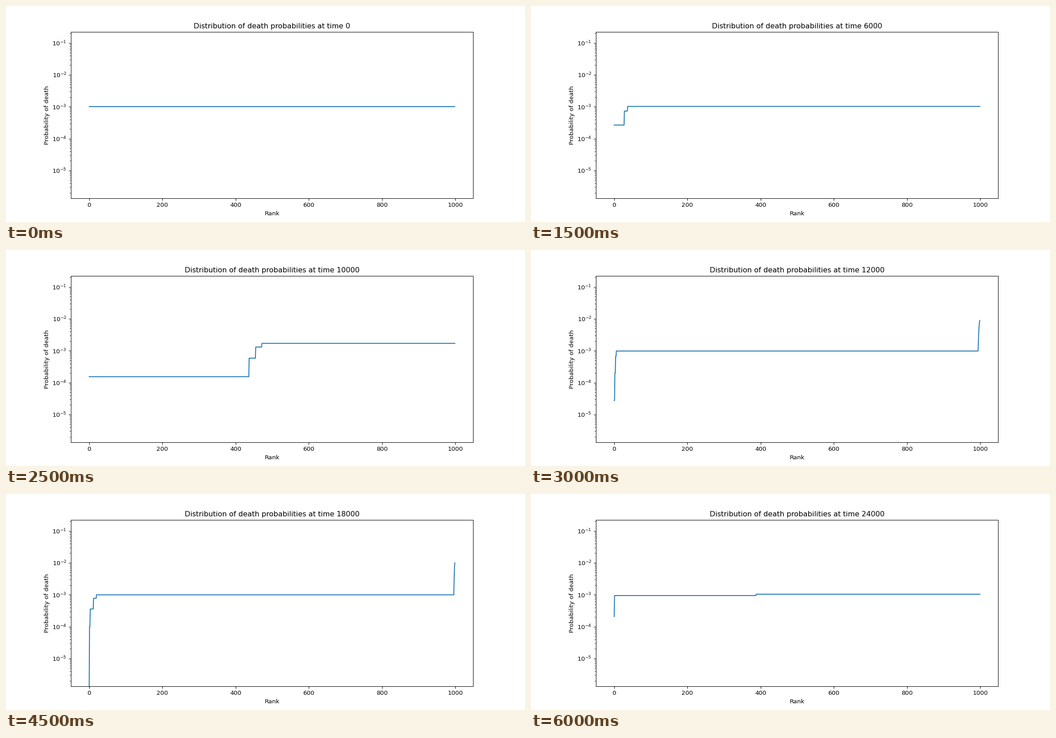
Recreate the animation shown at these times as a matplotlib script. Size 1159 by 483 pixels, loop 6500 ms.

```python
import matplotlib.pyplot as plt
import numpy as np
from matplotlib.animation import FuncAnimation

FIG_WIDTH, FIG_HEIGHT = 12, 5  # inches
DPI = 483 / FIG_HEIGHT         # gives a 1159 x 483 pixel canvas
COUNT = 1000
STEP_TIME = 2000
INTERVAL = 500

ranks = np.arange(COUNT)


def ease_out(t):
    return 1 - (1 - t) ** 2


def smoothstep(t):
    return t * t * (3 - 2 * t)


def staircase(low=1, first=0, last=None, stairs=1, ease=ease_out,
              runt=None, tail=1, peak=1):
    """Sorted death probabilities, with levels relative to the main plateau.

    The curve stays at `low` up to rank `first`, climbs in log scale to the
    plateau at rank `last`, and lifts its final `tail` ranks up to `peak`.
    `runt` is the level of the single lowest rank.
    """
    starts = np.linspace(first, last or first, stairs)
    climbed = (ranks[:, None] >= starts).sum(axis=1) / stairs
    levels = low ** (1 - ease(climbed))
    if runt is not None:
        levels[0] = runt
    end = np.clip((ranks - (COUNT - 1 - tail)) / tail, 0, 1)
    levels *= peak ** ease_out(end)
    return levels / levels.sum()


snapshots = [
    staircase(),
    staircase(low=.16, first=4),
    staircase(low=.28, first=12, last=15, stairs=2),
    staircase(low=.26, first=28, last=37, stairs=2),
    staircase(low=.2, first=120, last=130, stairs=2),
    staircase(low=.09, first=437, last=472, stairs=3),
    staircase(low=.028, first=2, last=6, stairs=3, tail=5, peak=9.1),
    staircase(low=.08, first=3, last=40, stairs=3, tail=3, peak=5),
    staircase(low=.06, first=59, last=212, stairs=5, ease=smoothstep,
              runt=.04, tail=3, peak=11.7),
    staircase(low=.1, first=3, last=20, stairs=3, runt=.00136, tail=3, peak=10),
    staircase(low=.704, first=562),
    staircase(low=.37, first=3),
    staircase(low=.907, first=388, runt=.2),
]

plt.rcParams["font.family"] = "DejaVu Sans"
fig, ax = plt.subplots(figsize=(FIG_WIDTH, FIG_HEIGHT), dpi=DPI)
line, = ax.plot(ranks, snapshots[0])
ax.set_yscale("log")
ax.set_ylim(10 ** -5.87, 10 ** -0.654)
ax.set_xlabel("Rank")
ax.set_ylabel("Probability of death")
title = ax.set_title("")


def update(frame):
    line.set_ydata(snapshots[frame])
    title.set_text(f"Distribution of death probabilities at time {frame * STEP_TIME}")
    return line, title


animation = FuncAnimation(fig, update, frames=len(snapshots), interval=INTERVAL,
                          repeat=True, repeat_delay=0)
plt.show()
```
